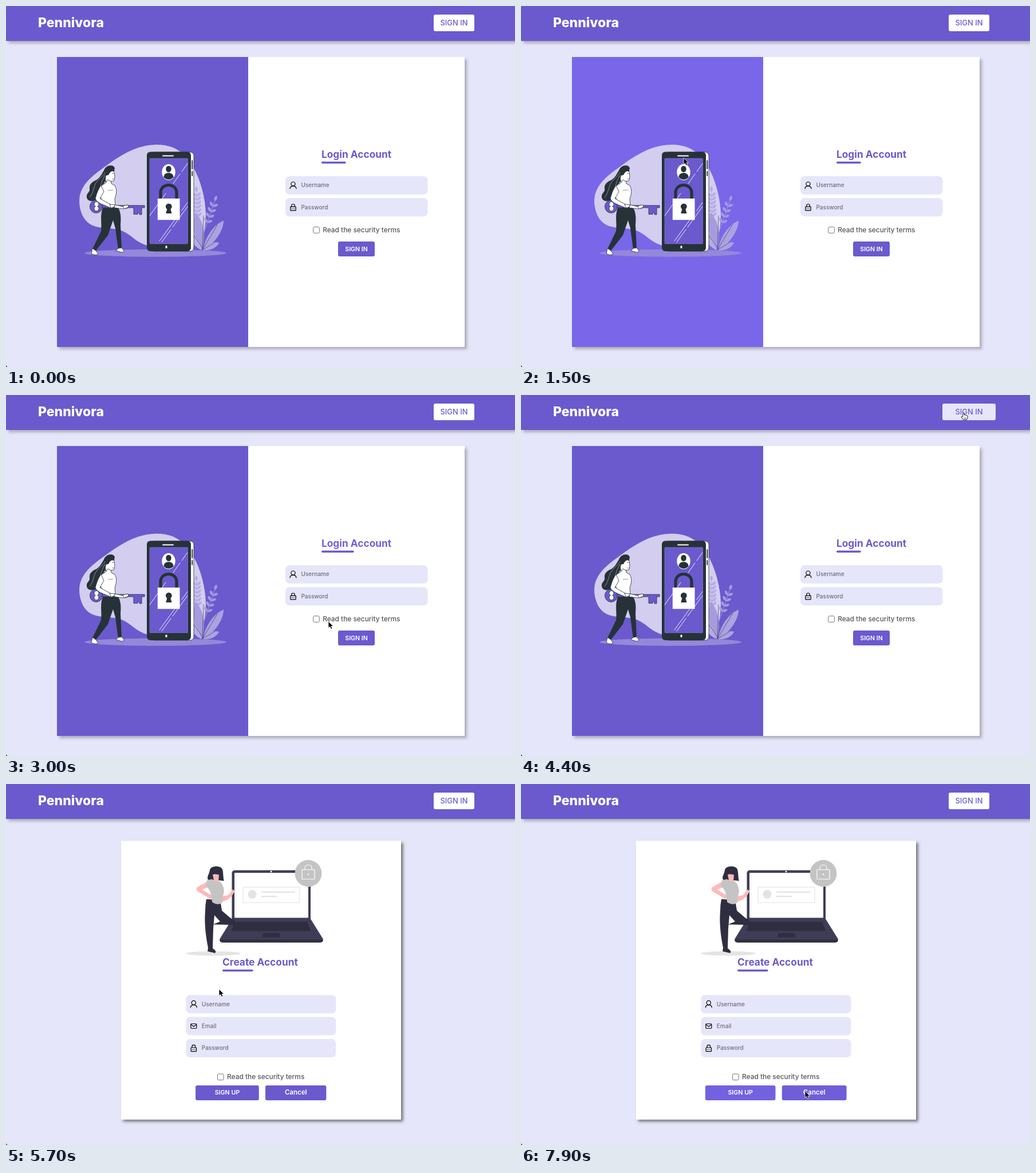
Animation, 889 px wide and 630 px high, one loop 8000 ms. Source, as an HTML page:

```html
<!DOCTYPE html>
<html lang="en">
<head>
<meta charset="utf-8">
<title>Account login</title>
<style>
html, body { margin: 0; width: 100%; height: 100%; overflow: hidden; background: #e6e6fa; }
svg { display: block; width: 100%; height: 100%; }
text { font-family: Inter, "Open Sans", sans-serif; font-weight: 500; }
.title { font-size: 17.3px; font-weight: 700; }
.hint { font-size: 10px; fill: #6d6c7c; }
.terms { font-size: 11.9px; fill: #55555c; }
.btn { font-weight: 600; fill: #fff; text-anchor: middle; }
.icon { fill: none; stroke: #000; stroke-width: 1.2; }
</style>
</head>
<body>
<svg id="stage" viewBox="0 0 889 630"></svg>
<script>
const LOOP = 8000, STEP = 100;
const BASE = [106, 90, 205], BRIGHT = [123, 104, 238], LAV = [230, 230, 250], WHITE = [255, 255, 255];
const PURPLE = '#6a5acd', DARK = '#263238', NIGHT = '#2f2e41', SKIN = '#ffb8b8', GREY = '#c4c4c4';

// Drawing helpers
const rect = (x, y, w, h, fill, rx = 0, more = '') =>
  `<rect x="${x}" y="${y}" width="${w}" height="${h}" rx="${rx}" fill="${fill}" ${more}/>`;
const oval = (x, y, rx, ry, fill, more = '') =>
  `<ellipse cx="${x}" cy="${y}" rx="${rx}" ry="${ry}" fill="${fill}" ${more}/>`;
const path = (d, fill, more = '') => `<path d="${d}" fill="${fill}" ${more}/>`;
const line = (d, color, w = 1, more = '') =>
  path(d, 'none', `stroke="${color}" stroke-width="${w}" stroke-linecap="round" stroke-linejoin="round" ${more}`);
const text = (x, y, str, cls, more = '') => `<text x="${x}" y="${y}" class="${cls}" ${more}>${str}</text>`;

const icons = {
  user: `<circle cx="0" cy="-2.4" r="3.6"/><path d="M-5.6 6.2C-5.2-.2 5.2-.2 5.6 6.2"/>`,
  lock: `<rect x="-4.7" y="-1" width="9.4" height="6.6" rx=".6"/><path d="M-2.8-1V-3C-2.8-6.4 2.8-6.4 2.8-3V-1M-2.8 2.4h1M-.5 2.4h1M1.8 2.4h1"/>`,
  mail: `<rect x="-5" y="-4" width="10" height="8" rx="1.2"/><path d="M-4.8-2.8L0 .7L4.8-2.8"/>`
};
const field = (x, y, w, icon, label) =>
  rect(x, y, w, 32, '#e6e6fa', 7) +
  `<g class="icon" transform="translate(${x + 13.5} ${y + 16})">${icons[icon]}</g>` +
  text(x + 27.5, y + 19.3, label, 'hint');
const terms = (x, y) =>
  rect(x, y, 10.6, 10.6, '#fff', 1.8, 'stroke="#767676" stroke-width="1"') +
  text(x + 16.5, y + 9.2, 'Read the security terms', 'terms');
const button = (id, x, y, w, h, label, size, base, more = '') =>
  `<g id="${id}">` + rect(x, y, w, h, PURPLE, 3) +
  text(x + w / 2, base, label, 'btn', `style="font-size:${size}px;${more}"`) + '</g>';
const title = (id, x, y, label) =>
  `<g id="${id}" fill="${PURPLE}">` + text(x, y, label, 'title') + rect(x, y + 6.3, 43, 3.6, PURPLE, 1.8) + '</g>';

function leaf(x, y, angle, len, wide, fill) {
  return path(`M0 0C${-wide} ${-len * .4} ${-wide * .7} ${-len * .8} 0 ${-len}C${wide * .7} ${-len * .8} ${wide} ${-len * .4} 0 0Z`,
    fill, `transform="translate(${x} ${y}) rotate(${angle})"`);
}
function sprig(x, y, angle, len, pairs, fill) {
  let s = line(`M0 0V${-len}`, fill, .9) + leaf(0, -len + 3, 0, 10, 3.8, fill);
  for (let i = 0; i < pairs; i++) {
    const at = -len * (.35 + .6 * i / pairs);
    s += leaf(0, at, 48, 10, 3.6, fill) + leaf(0, at, -48, 10, 3.6, fill);
  }
  return `<g transform="translate(${x} ${y}) rotate(${angle})">${s}</g>`;
}

function phoneScene() {
  const ink = `stroke="${DARK}" stroke-width=".8"`;
  const plants = sprig(335, 392, -2, 70, 6, '#b4abe5') + sprig(344, 400, 19, 66, 4, '#a69bdf') +
    leaf(342, 426, -9, 66, 13, '#a69bdf') + leaf(344, 426, 35, 63, 12, '#aca2e2') +
    leaf(343, 426, 66, 32, 8, '#aca2e2') + leaf(341, 426, -34, 42, 9, '#b4abe5') +
    line('M343 426L345 366M344 424L369 382M343 422L328 400M344 425L364 413', DARK, .6);
  const phone = rect(252, 255, 76, 173, '#fff', 6, ink) + rect(246, 254.5, 77, 173.5, DARK, 6) +
    rect(251, 266, 66.5, 149, PURPLE, 1, 'stroke="#8e82da" stroke-width=".6"') +
    line('M274 261.5H292', '#fff', 2) + oval(280, 420.5, 1.7, 2.5, '#fff') +
    line('M325.3 270V284M325.3 289V296', DARK, 1.8) +
    line('M251 366L279 327M292 310L304 293M307 289L317 275M268 410L303 362M307 357L317 343M272 412L288 390M291 386L317 350', '#fff', .9) +
    oval(284, 290, 11.7, 14, '#fff') + oval(284, 284.5, 4.7, 5.6, DARK) +
    path('M275.4 299C275.4 288.5 292.6 288.5 292.6 299Q284 307 275.4 299Z', DARK) +
    line('M270 338V326C270 308 298 308 298 326V338', DARK, 5.2) +
    rect(264.8, 336, 38.7, 37.3, '#fff') + oval(284.3, 350, 5.4, 5.2, DARK) +
    path('M282 352H286.7L289.5 362H279.2Z', DARK);
  const key = oval(157.5, 350, 11, 11.3, PURPLE, ink) + oval(158, 346, 4, 4.3, '#fff', ink) +
    oval(158, 353.5, 4, 4.3, '#fff', ink) + path('M157 345h2v10h-2Z', '#fff') +
    path('M168 348H242V352H237V364H233V361H230V363.5H223V352H168Z', PURPLE, ink);
  const woman =
    path('M171 287C174 278 187 275 190 283L188 291L172 307C169 313 171 318 170 324C169 333 162 339 153 340C145 342 140 337 141 331C142 325 147 325 146 319C145 311 151 307 155 305C163 302 166 295 171 287Z', DARK) +
    line('M177 284C171 298 159 302 155 313C152 322 151 329 146 334M173 295C164 309 164 325 158 334', '#fff', .45) +
    path('M174 300L183 305L184 310L190 313C195 322 192 331 190 336L191 348L169 350C169 339 164 333 164 326C163 316 168 311 173 310Z', '#fff', ink) +
    path('M178 288C182 284 187 287 189 290L190 297L189 304C187 307 181 306 178 303L175 308Q172 301 175 294Z', '#fff', ink) +
    path('M174 296C171 285 177 279 186 279Q190 282 189 289Q183 286 179 295Z', DARK) +
    line('M186 292.5h2M186 302h2', DARK, .7) +
    path('M170 350H195C201 360 201 370 200 382L202 424L196 425L191 388L187 374L178 400L157 427L151 424L166 393C168 377 163 365 170 350Z', DARK) +
    path('M151 423L157 427L161 433Q155 436 149 432Z', '#fff', ink) +
    path('M196 423L202 422L206 427Q205 431 199 429L192 427Z', '#fff', ink) + key +
    path('M166 313C159 323 158 330 156 336Q158 342 168 346L184 353L188 349L180 345L164 336L171 324Z', '#fff', ink) +
    path('M181 346L191 347Q188 353 183 352Z', '#fff', ink) +
    path('M190 347L204 350L213 348L212 353L203 354L189 352Z', '#fff', ink) +
    path('M204 349L213 347L214 351L206 354Z', '#fff', ink) + line('M178 322L187 321', DARK, .5);
  return path('M262 242C305 241 324 270 336 300C347 329 353 364 346 393L326 418H247C225 412 218 397 199 391C178 385 158 391 142 377C128 364 125 338 131 324C139 304 157 292 176 278C197 263 225 243 262 242Z', '#d3cdef') +
    oval(261, 431.2, 124, 6.5, '#9488d9') + plants + phone + woman;
}

function laptopScene() {
  const frame = '#3f3d56';
  const laptop = rect(394.5, 150.5, 137.5, 90, frame, 5) + rect(399, 155, 129, 78.5, '#fff', 1) +
    oval(463, 152.8, 1.5, 1.5, '#fff') +
    path('M395 235.5H532L553.5 270Q554.5 276.5 549 276.5H378Q372.5 276.5 373.5 270Z', frame) +
    path('M373.5 271.5H553.5Q554 276.5 549 276.5H378Q373 276.5 373.5 271.5Z', NIGHT) +
    path('M400 240.5H526L532.5 256.5H393.5Z', NIGHT) + path('M450 260H477L479.5 267.5H447Z', NIGHT) +
    rect(414, 180, 99, 27, '#fff', 0, 'stroke="#e0e0e0" stroke-width="1"') + oval(430, 192.5, 7.5, 7.5, '#e3e3e3') +
    line('M447 188.6H504M447 196.2H472', '#e3e3e3', 2.3) +
    oval(528, 156, 23.4, 23.4, GREY) + rect(517, 149.5, 22, 16.5, 'none', .5, 'stroke="#fff" stroke-width="1.2"') +
    line('M522 149V147C522 139 534 139 534 147V149', '#fff', 1.2) + oval(528, 157.8, 1.3, 1.3, '#fff');
  const woman = path('M356 150C358 142 375 142 378 149C380 156 379 165 381 169L370 168L353 167C350 162 355 158 356 150Z', NIGHT) +
    path('M350 201Q348 210 348 221C346 244 349 266 353 286L352 292L365 295Q369 292 361 287L362 252L364 229L374 240L362 245L397 246Q400 238 391 233L377 221L374 202Z', NIGHT) +
    path('M396 234L402 243L397 248L390 241Z', NIGHT) +
    path('M361 158Q366 156 372 158L371 170Q375 177 366 176L359 170L363 168Z', SKIN) +
    path('M357 152Q367 146 377 153L374 159Q366 156 359 158L359 169L353 167Z', NIGHT) +
    path('M356 168L334 180Q331 184 334 187L356 200L362 199L362 196L342 184L357 179Z', SKIN) +
    path('M377 196L388 194L396 184L400 187L393 197Q384 205 376 205Z', SKIN) +
    path('M351 168L360 166Q366 173 371 169Q379 172 381 186C380 194 377 200 378 207Q370 213 360 206C359 194 357 184 349 178Z', GREY);
  return oval(362, 295.7, 48, 3.8, '#e4e4e4') + laptop + woman;
}

document.getElementById('stage').innerHTML = `
<defs>
  <filter id="soft" x="-5%" y="-20%" width="110%" height="150%"><feDropShadow dx="4" dy="4" stdDeviation="2.5" flood-opacity=".25"/></filter>
  <filter id="deep" x="-5%" y="-5%" width="110%" height="110%"><feDropShadow dx="3.5" dy="3.5" stdDeviation="2.5" flood-opacity=".5"/></filter>
</defs>` +
rect(0, 0, 889, 630, '#e6e6fa') +
rect(0, -10, 889, 71, PURPLE, 0, 'filter="url(#soft)"') +
text(56, 37, 'Pennivora', '', 'fill="#fff" style="font-size:23px;font-weight:800"') +
button('enter', 747, 15, 71, 29, 'SIGN IN', 12.9, 34.2, `fill:${PURPLE};font-weight:500`) +
'<g id="login">' +
  rect(89, 89, 712, 506, '#fff', 0, 'filter="url(#soft)"') +
  rect(89, 89, 334, 506, PURPLE, 0, 'id="panel"') + phoneScene() +
  title('loginTitle', 551, 265.2, 'Login Account') +
  field(488, 297, 248.5, 'user', 'Username') + field(488, 335.3, 248.5, 'lock', 'Password') +
  terms(536.7, 385.7) + button('submit', 580, 411, 64, 26, 'SIGN IN', 10.6, 427.7) +
'</g><g id="signup">' +
  rect(201, 99, 489, 486.5, '#fff', 0, 'filter="url(#deep)"') + laptopScene() +
  title('newTitle', 378, 317.4, 'Create Account') +
  field(314.3, 368.2, 262, 'user', 'Username') + field(314.3, 406.5, 262, 'mail', 'Email') +
  field(314.3, 445, 262, 'lock', 'Password') + terms(369.5, 506) +
  button('create', 331, 526, 110.7, 26, 'SIGN UP', 10.7, 542.4) +
  button('cancel', 453, 526, 106.3, 26, 'Cancel', 11.5, 542.4) +
'</g>' + path('M0 626.5Q.5 629.5 3 630H0Z', '#222') +
'<g id="arrow">' + path('M0 0V11.6L2.7 9.2L4.7 13.4L6.8 12.4L4.9 8.4H8.6Z', '#000', 'stroke="#fff" stroke-width=".8"') +
'</g><g id="hand">' +
  path('M-1.2 7V.8Q0-.8 1.2.8V4Q2.6 3.2 3.2 4.4Q4.8 3.8 5.2 5Q7 4.6 7 6.4V9L5.6 12H-.6L-3.9 7.6Q-3.6 5.6-1.2 7Z', '#fff', 'stroke="#000" stroke-width=".9"') +
  line('M1.6 8V10.4M3.6 8V10.4', '#000', .6) + '</g>';

const el = {};
document.querySelectorAll('[id]').forEach(n => el[n.id] = n);

// CSS "ease" timing, cubic-bezier(.25, .1, .25, 1)
function ease(x) {
  if (x <= 0) return 0;
  if (x >= 1) return 1;
  let lo = 0, hi = 1, u = .5;
  for (let i = 0; i < 16; i++) {
    u = (lo + hi) / 2;
    const bx = .75 * u * (1 - u) + u * u * u;
    if (bx < x) lo = u; else hi = u;
  }
  return .3 * u * (1 - u) ** 2 + 3 * u * u * (1 - u) + u * u * u;
}
const hover = (t, on, off, time) => ease((Math.min(t, off) - on) / time) * (1 - ease((t - off) / time));
const mix = (a, b, k) => `rgb(${a.map((v, i) => Math.round(v + (b[i] - v) * k))})`;

// Pointer stops: time, x, y
const stops = [
  [100, 873, 85], [300, 826, 52], [500, 803, 36], [800, 788, 32], [1000, 778, 36], [1100, 728, 72],
  [1200, 640, 112], [1300, 536, 146], [1400, 390, 214], [1500, 284, 265], [1700, 262, 284], [1800, 300, 282],
  [1900, 410, 274], [2000, 509, 266], [2300, 618, 260], [2500, 606, 264], [2700, 573, 288], [2900, 540, 373],
  [3000, 563, 395], [3300, 612, 422], [3800, 622, 414], [4000, 677, 291], [4100, 734, 134], [4200, 770, 42],
  [4300, 773, 31], [4800, 773, 31], [5000, 705, 78], [5100, 628, 121], [5200, 576, 151], [5500, 432, 320],
  [5700, 372, 358], [5900, 400, 333], [6100, 426, 317], [6300, 420, 319], [6500, 388, 338], [6700, 349, 403],
  [7100, 343, 445], [7300, 372, 463], [7500, 436, 486], [7600, 437, 530], [7800, 470, 540], [7900, 496, 536]
];
function pointer(t) {
  const i = stops.findIndex(s => s[0] > t);
  if (i < 0) return stops[stops.length - 1].slice(1);
  const [a, b] = [stops[i - 1], stops[i]], k = (t - a[0]) / (b[0] - a[0]);
  return [a[1] + (b[1] - a[1]) * k, a[2] + (b[2] - a[2]) * k];
}

function setButton(g, x, w, fill) {
  const [box, label] = g.children;
  box.setAttribute('x', x);
  box.setAttribute('width', w);
  box.setAttribute('fill', fill);
  label.setAttribute('x', x + w / 2);
}
function setTitle(g, k, from, to) {
  g.setAttribute('fill', mix(BASE, BRIGHT, k));
  g.children[1].setAttribute('width', from + (to - from) * k);
}

function draw(t) {
  const signup = t >= 4700;
  el.login.style.display = signup ? 'none' : '';
  el.signup.style.display = signup ? '' : 'none';

  const top = hover(t, 250, 1040, 300) + hover(t, 4080, 4940, 300);
  setButton(el.enter, 747 - 11 * top, 71 + 22 * top, mix(WHITE, LAV, top));
  el.panel.setAttribute('fill', mix(BASE, BRIGHT, hover(t, 1330, 1900, 300)));
  setTitle(el.loginTitle, hover(t, 2020, 2840, 500), 42.7, 74);
  const send = hover(t, 3180, 3820, 400);
  setButton(el.submit, 580 - 5 * send, 64 + 10 * send, mix(BASE, BRIGHT, send));

  setTitle(el.newTitle, hover(t, 5750, 6580, 500), 53.6, 86);
  const up = hover(t, 7565, 7800, 500), no = hover(t, 7800, LOOP, 500);
  const upW = 110.7 + 22 * up, noW = 106.3 + 22 * no, left = 445.2 - (upW + noW + 11.3) / 2;
  setButton(el.create, left, upW, mix(BASE, BRIGHT, up));
  setButton(el.cancel, left + upW + 11.3, noW, mix(BASE, BRIGHT, no));

  const shown = t >= 100, hand = (t >= 400 && t < 1050) || (t >= 4200 && t < 4900);
  el.arrow.style.display = shown && !hand ? '' : 'none';
  el.hand.style.display = shown && hand ? '' : 'none';
  if (shown) {
    const move = `translate(${pointer(t)})`;
    el.arrow.setAttribute('transform', move);
    el.hand.setAttribute('transform', move);
  }
}

const start = performance.now();
function tick() {
  const t = (performance.now() - start) % LOOP;
  draw(Math.floor(t / STEP) * STEP);
  requestAnimationFrame(tick);
}
draw(0);
tick();
</script>
</body>
</html>
```
